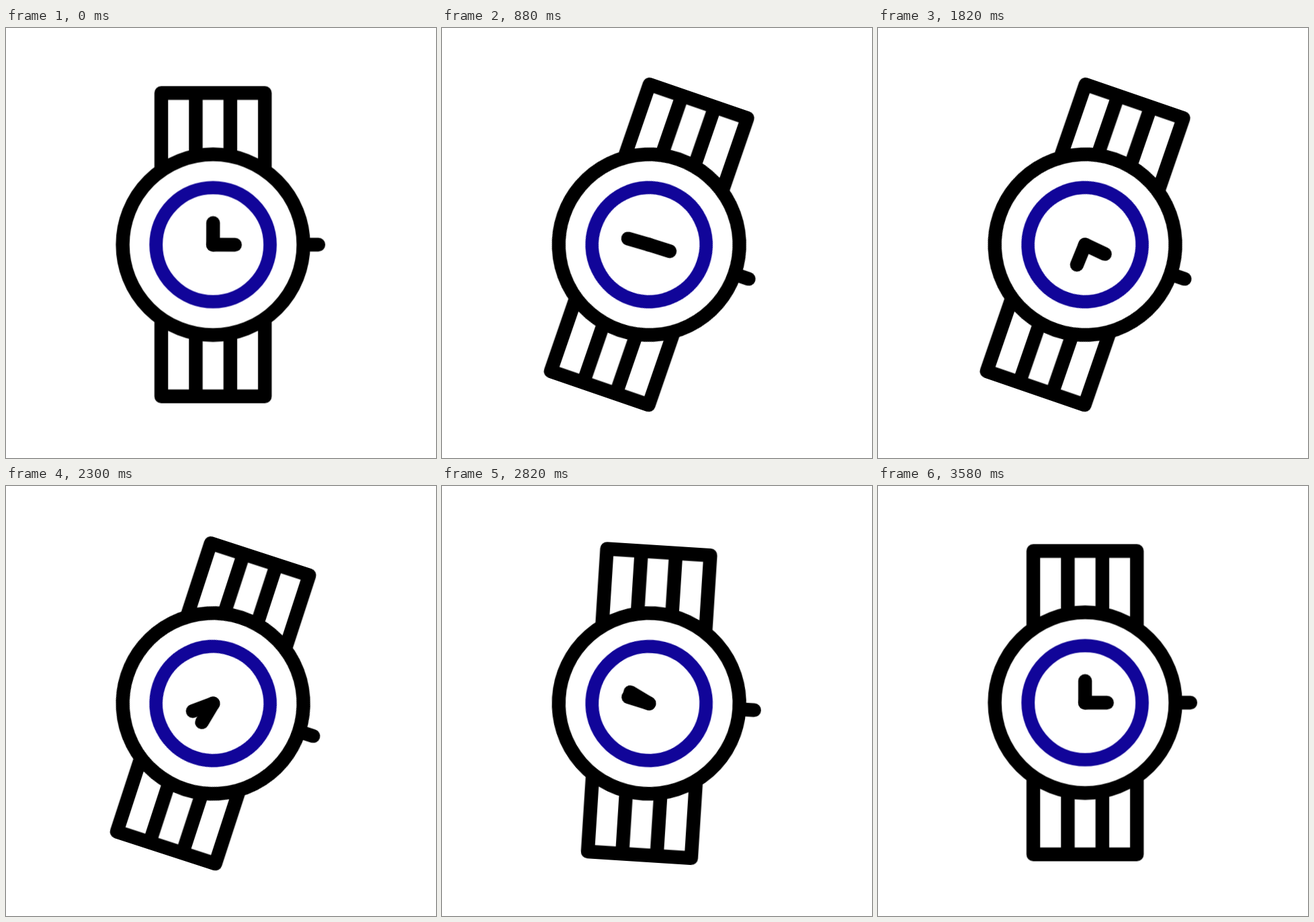
These frames come from a looping animation (640x640 px, 3.6 s). An HTML page without scripts:

```html
<!DOCTYPE html>
<html lang="en">
<head>
<meta charset="utf-8">
<title>Wristwatch</title>
<style>
  html, body { margin: 0; width: 100%; height: 100%; overflow: hidden; background: #fff; }
  svg { display: block; width: 100%; height: 100%; }

  .lines {
    fill: none; stroke: #000; stroke-width: 20.4;
    stroke-linecap: round; stroke-linejoin: round;
  }
  .face { fill: #fff; }
  .dial { stroke: #110599; stroke-width: 19.8; }

  .bob, .tilt, .hand { animation: 3.6s infinite; transform-origin: 0 0; }
  .bob, .tilt { animation-timing-function: cubic-bezier(.333, 0, .667, 1); }
  .bob { animation-name: bob; }
  .tilt { animation-name: tilt; }
  .hand { animation-name: turn; animation-timing-function: linear; }
  .hour { --sweep: 360deg; }
  .minute { --sweep: 720deg; }

  @keyframes bob {
    0%, 14.44%, 60.56%, 81.67%, 100% { transform: translateY(0); }
    6.67% { transform: translateY(3.5px); }
    71.11% { transform: translateY(5px); }
  }
  @keyframes tilt {
    0%, 85.28%, 100% { transform: rotate(0deg); }
    17.22%, 60.56% { transform: rotate(19deg); }
  }
  /* The last 20 ms rest on the closed turn. */
  @keyframes turn {
    0% { transform: rotate(0deg); }
    99.444%, 100% { transform: rotate(var(--sweep)); }
  }
</style>
</head>
<body>
<svg viewBox="0 0 640 640">
  <g class="lines" transform="translate(308.2 322.5)">
    <g class="bob">
      <g class="tilt">
        <rect x="-77.1" y="-225.7" width="154.2" height="451.4"/>
        <path d="M-25.7-225.7V225.7M25.7-225.7V225.7M134.5 0H156.8"/>
        <circle class="face" r="134.5"/>
        <circle class="dial" r="84.9"/>
        <path class="hand hour" d="M0 0V-32.4"/>
        <path class="hand minute" d="M0 0H32.6"/>
      </g>
    </g>
  </g>
</svg>
</body>
</html>
```
